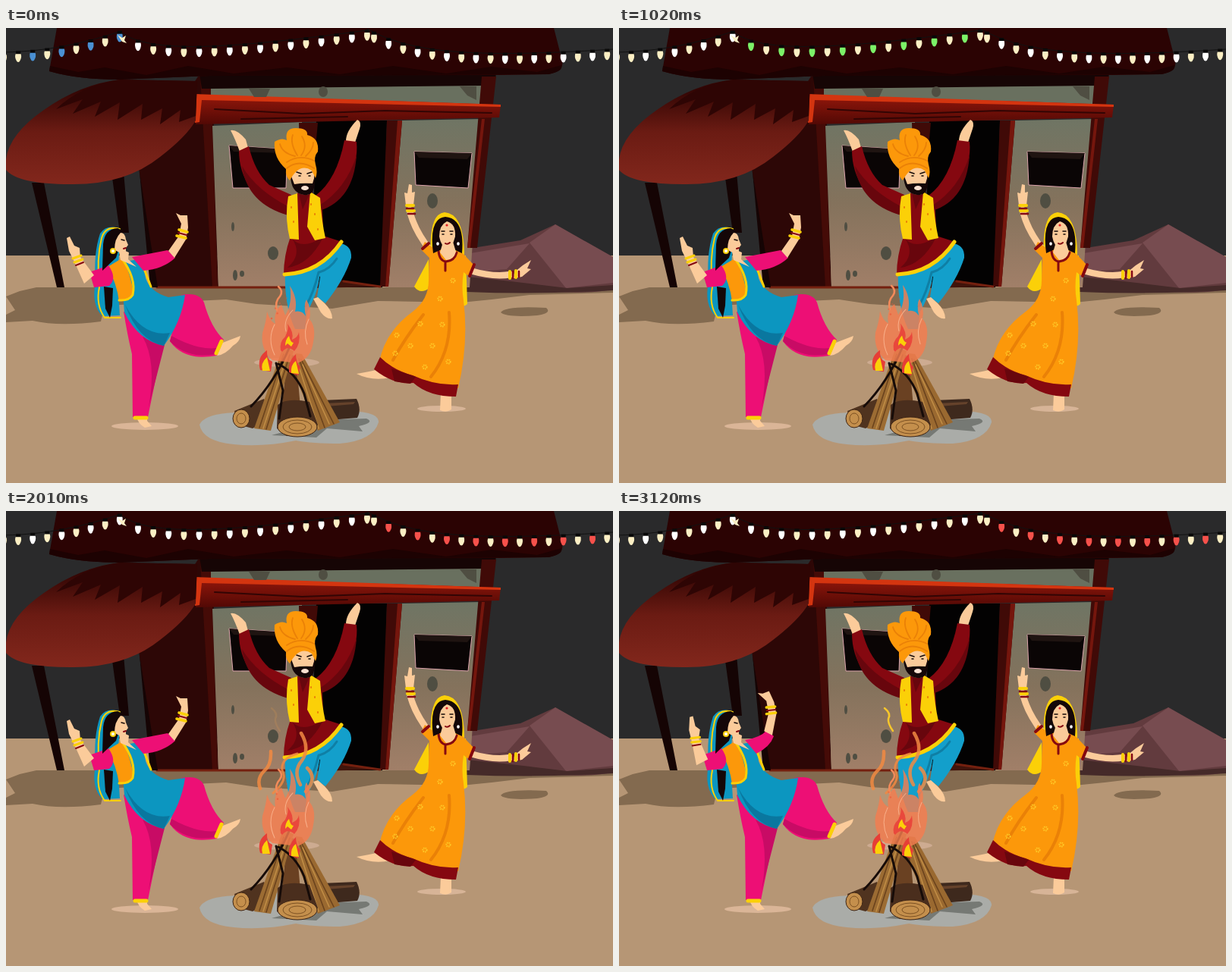
These frames come from a looping animation (800x600 px, 3.15 s). An HTML page:

```html
<!DOCTYPE html>
<html lang="en">
<head>
<meta charset="utf-8">
<title>Bonfire dance</title>
<style>
html,body{margin:0;width:100%;height:100%;overflow:hidden;background:#2a2a2b}
svg{display:block;width:800px;height:600px}
.skin{fill:#fbcb9a}.skinLine{fill:none;stroke:#fbcb9a;stroke-width:8.5;stroke-linecap:round}
.maroon{fill:#850810}.deep{fill:#68060d}.teal{fill:#0c96c0}.blue{fill:#139fcb}.pink{fill:#ed0f75}
.orange{fill:#fc980a}.yellow{fill:#fbd008}.black{fill:#140708}
.line{fill:none;stroke-linecap:round;stroke-linejoin:round}
.yl{stroke:#fbd008}.ml{stroke:#850810}.ol{stroke:#ea8107}.kl{stroke:#160b08}
.B,.b .A{display:none}.b .B{display:inline}
.b #manLeft{transform:scale(.94);transform-origin:370px 245px}
.b #manRight{transform:scale(1,.95);transform-origin:415px 240px}
.b #wristLeft{transform:rotate(13deg);transform-origin:110px 332px}
.b #wristRight{transform:translate(-20px,-5px) rotate(-21deg);transform-origin:216px 302px}
#lady.b{transform:translate(-1px,-10px)}
.b #raised{transform:scale(1,.91);transform-origin:555px 290px}
.bulb{fill:#fff}.cream{fill:#fcefc4}
.c0 .s0{fill:#4a90d2}.c1 .s1{fill:#7cf268}.c2 .s2{fill:#f6514b}
</style>
</head>
<body>
<svg id="stage">
<defs>
<linearGradient id="thatch" x2="0" y2="1"><stop offset=".1" stop-color="#330604"/><stop offset=".5" stop-color="#6b1b13"/><stop offset="1" stop-color="#82271c"/></linearGradient>
<linearGradient id="wall" x2="0" y2="1"><stop stop-color="#6f7564"/><stop offset=".5" stop-color="#84725c"/><stop offset="1" stop-color="#a17f68"/></linearGradient>
<linearGradient id="beam" x2="0" y2="1"><stop stop-color="#94170b"/><stop offset="1" stop-color="#520905"/></linearGradient>
</defs>

<!-- ground and yard -->
<path fill="#2a2a2b" d="M0 0H800V300H0Z"/>
<path fill="#b69675" d="M0 300H800V600H0Z"/>
<path fill="#836a4f" d="M0 354L18 347L40 342H640L800 346V349L690 352L640 358L600 362L490 360L430 370L330 364L290 358L130 366L125 387Q70 394 35 386L0 388V378L12 372Z"/>
<path fill="#836a4f" d="M652 375Q658 366 712 369Q720 376 700 379Q660 382 652 375Z"/>
<path fill="#623b3e" d="M603 292L678 280L724 259L800 302V345Q760 352 700 346L607 348Z"/>
<path fill="#774c50" d="M612 297L690 284L660 318L612 322ZM690 283L724 259L800 302V336L738 343Z"/>
<path fill="#452a29" d="M608 328L665 334L740 343L800 339V346Q700 352 607 348Z"/>

<!-- hut -->
<path fill="#2d0706" d="M175 185L253 64H272L280 343H198Z"/>
<path fill="#450b07" d="M256 64H270L279 342H272Z"/>
<path fill="#160505" d="M255 60H646L643 80H258Z"/>
<path fill="#69705f" d="M270 80L630 76V102L270 93Z"/>
<path fill="url(#wall)" d="M272 129L390 124L394 342H280ZM520 122L626 120L611 342H500Z"/>
<path fill="#030202" d="M409 122H502L496 342H402Z"/>
<path fill="#40140b" d="M404 336L440 332L495 341L404 343Z"/>
<path fill="#400a07" d="M386 125H411L404 200V342H392ZM502 122H522L504 341H493ZM627 64H646L621 290H608Z"/>
<path fill="#75160d" d="M516 122H522L504 341H500ZM627 120H631L612 290H608Z"/>
<path fill="url(#beam)" d="M248 88L652 101L650 118L250 127Z"/>
<path fill="#d43510" d="M248 87L652 101V104L258 95L255 124L249 125Z"/>
<path class="line" stroke="#320504" stroke-width="2" d="M275 107L390 113L500 109L640 112M310 120L450 117"/>
<path fill="#0a0505" stroke="#dca4ac" d="M294 155L371 160L369 211H299ZM538 163L614 165L609 211L540 207Z"/>
<path fill="#1f1411" d="M294 155L371 160V165L300 163ZM538 163L614 165L608 173L544 171Z"/>
<path class="line" stroke="#74200f" stroke-width="3" d="M199 342H395M445 334L493 341"/>
<g fill="#4f4e42"><ellipse cx="352" cy="297" rx="7" ry="9"/><ellipse cx="562" cy="228" rx="7" ry="10"/><ellipse cx="418" cy="84" rx="6" ry="7"/><ellipse cx="299" cy="262" rx="2" ry="6"/><ellipse cx="302" cy="326" rx="3" ry="7"/><ellipse cx="311" cy="324" rx="3" ry="4"/><path d="M320 80h28l-5 11h-16zM598 77h22v18l-12-6z"/></g>
<path fill="#150404" d="M34 204H50L77 342H67ZM139 190H155L162 270H150ZM176 190L200 342H190Z"/>
<path fill="url(#thatch)" d="M150 68L252 70L250 122Q238 143 203 170Q157 207 85 206Q15 206 0 187Q-5 146 50 108Q98 74 150 68Z"/>
<path fill="#2e0504" d="M150 68L252 70L250 116L228 124L230 108L203 127L206 106L178 121L180 100L147 121L150 98L117 117L125 97L88 113L101 94L66 107Q98 76 150 68Z"/>
<path fill="#2b0303" d="M67 0L57 57Q95 68 150 68L270 63L650 62L715 61Q736 57 733 43L722 0Z"/>
<path fill="#1d0202" d="M58 50L95 58L130 52L185 62L240 50L300 60L370 52L440 61L510 50L580 60L640 51L700 58L732 49Q735 57 715 61L270 63L150 68Q95 68 57 57Z"/>
<g id="lights"></g>

<!-- turbaned dancer -->
<g id="man">
<ellipse cx="370" cy="441" rx="43" ry="6" fill="#cdab91"/>
<path class="blue A" d="M368 318L414 315Q414 345 397 374L394 397H381Q366 365 368 318Z"/>
<path class="blue B" d="M368 318L414 315Q412 345 395 370L393 380H372Q365 345 368 318Z"/>
<path class="blue" d="M400 318L438 284Q456 285 455 303Q446 332 421 363L410 355L414 328Z"/>
<path class="line" stroke="#0f7fa5" stroke-width="3" d="M412 322Q406 348 395 367M413 322Q427 318 436 304"/>
<path class="skin" d="M411 355L420 363Q430 373 430 383Q423 385 415 375L405 357Z"/>
<path class="maroon" d="M372 224L386 217H402L416 226Q418 252 418 274L443 282Q416 326 366 325Q366 300 375 275Z"/>
<path class="deep" d="M376 276Q388 294 418 276Q400 312 371 316Q392 298 376 276Z"/>
<path class="line yl" stroke-width="5" d="M367 325Q414 323 442 282"/>
<g id="manLeft"><path class="skin" d="M319 158L308 163Q302 146 296 135Q304 133 316 147Z"/><path class="maroon" d="M307 162L320 156Q328 190 347 207L376 220L372 247Q340 236 322 212Q307 188 307 162Z"/><path class="deep" d="M311 182Q330 214 373 236L372 247Q318 232 311 182Z"/></g>
<g id="manRight"><path class="skin" d="M448 149Q448 136 463 121Q469 123 466 133L460 151Z"/><path class="maroon" d="M446 148L462 150Q465 178 447 210Q432 235 412 241L408 221Q436 200 446 148Z"/><path class="deep" d="M462 168Q448 212 413 234V241Q458 227 462 168Z"/></g>
<path class="yellow" d="M372 222L384 218L386 279L374 278Q367 250 372 222ZM401 216L414 224Q416 255 421 277L407 280L397 262Z"/>
<path class="line ol" stroke-width="2" d="M376 236v1M379 255v1M407 245v1M411 265v1M402 232v1"/>
<path class="deep" d="M386 218L391 239L401 217Z"/>
<path class="skin" d="M375 185Q390 174 407 187L405 212L398 220L388 219Q375 210 375 185Z"/>
<path class="black" d="M375 193L380 206Q391 204 404 205L407 195Q409 222 393 220Q375 218 375 193Z"/>
<ellipse cx="394" cy="211" rx="5" ry="3" fill="#f8e0d0"/>
<path class="line kl" stroke-width="1.6" d="M383 190l6 2M397 192l6-2M386 195h2M399 195h2"/>
<path class="orange" d="M369 186Q352 171 354 150Q363 144 370 148Q367 132 382 132Q398 132 397 141Q413 145 411 163Q405 170 408 180Q411 190 408 198L403 188Q387 177 374 201Q368 196 369 186Z"/>
<path class="line ol" stroke-width="1.8" d="M370 177Q387 166 406 175M370 185Q386 172 406 185M381 169Q364 165 361 153M384 168Q374 152 378 141M389 168Q398 156 390 143M395 169Q405 160 405 151"/>
</g>

<!-- dancer with blue scarf -->
<g id="girl">
<ellipse cx="183" cy="525" rx="44" ry="5" fill="#dab597"/>
<path class="teal" d="M151 265Q133 258 124 271Q115 298 118 335Q112 365 127 380L150 379L147 330Z"/>
<path class="line yl" stroke-width="2" d="M150 265Q131 260 126 277Q119 305 123 342Q118 365 130 382H151"/>
<path class="black" d="M129 341L141 343L140 366L137 382L131 370Z"/>
<path class="pink" d="M155 374L216 405L205 425L187 513H167L166 430Q160 405 155 374Z"/>
<path fill="#c80b65" d="M180 407L209 418L188 500Q199 440 180 407Z"/>
<path class="skin" d="M172 512H186V518L192 525L183 527Q174 522 172 512ZM283 416Q296 411 309 406Q308 414 299 419Q289 431 278 432Z"/>
<path class="pink" d="M231 352Q255 348 261 362Q270 395 287 411L278 432Q235 440 216 413Z"/>
<path fill="#c80b65" d="M218 406Q252 425 278 422L276 430Q239 437 216 413Z"/>
<path class="line yl" stroke-width="5" d="M170 514H185M284 413L277 429"/>
<path class="teal" d="M151 309L180 304L184 330Q190 348 214 355L236 352Q231 388 208 419Q174 412 156 375Z"/>
<path fill="#0a779f" d="M157 365Q180 408 216 402L208 419Q174 412 157 365Z"/>
<path class="orange" d="M134 315L154 303Q166 330 168 351Q162 361 149 360Q146 337 134 315Z"/>
<path class="line yl" stroke-width="3" d="M152 303Q172 330 167 352Q162 360 149 359M176 302L191 341"/>
<path class="skin" d="M148 290L162 296L161 305L172 315L151 306Z"/>
<path class="pink" d="M110 322L135 313Q147 330 136 340L116 342Z"/>
<path class="pink A" d="M166 302L213 293L223 303Q207 318 181 320Z"/>
<path class="pink B" d="M166 302Q186 299 195 289L204 297Q199 311 181 320Z"/>
<g id="wristLeft"><path class="skin" d="M103 337L90 308L83 294L80 277L84 275L90 287L97 290L98 302L116 326Z"/><path class="line yl" stroke-width="3" d="M88 304l11-4M90 309l11-4"/><path class="line ml" stroke-width="2" d="M92 313l10-4"/></g>
<g id="wristRight"><path class="skin" d="M214 294L228 274L231 258L224 244L230 247L239 247L240 263L237 279L222 303Z"/><path class="line yl" stroke-width="3.5" d="M228 266l11 3M225 274l12 3"/><path class="line ml" stroke-width="2" d="M227 270l11 3"/></g>
<path class="black" d="M128 285Q130 265 147 264Q155 266 154 275L145 303L127 320Z"/>
<path class="skin" d="M151 270Q157 270 158 279L161 286L158 290V295Q151 299 143 292Q143 278 151 270Z"/>
<path class="line kl" stroke-width="1.5" d="M152 279l4 1"/><path class="line ml" stroke-width="2" d="M155 291l3-1"/>
<circle class="yellow" cx="141" cy="294" r="4"/><circle cx="141" cy="294" r="2" fill="#fff"/>
</g>

<!-- dancer in the long dress -->
<g id="lady">
<ellipse cx="574" cy="502" rx="32" ry="4" fill="#d7b497"/>
<path class="yellow" d="M557 305L538 341Q546 352 558 343ZM594 300H606L608 364Q602 370 597 361ZM560 300Q557 245 578 243Q605 245 604 305Z"/>
<path class="skin" d="M573 482H587V503Q580 508 572 504ZM462 456Q480 453 492 450L507 461Q482 466 462 456Z"/>
<g id="raised"><path class="skinLine" d="M559 293Q537 265 532 240"/><path class="skin" d="M527 234L525 217L529 218L531 206L535 207L535 217L539 216L537 234Z"/><path class="line yl" stroke-width="4" d="M528 234H537M529 241H538"/><path class="line ml" stroke-width="2.5" d="M528 238H537M530 245H539"/></g>
<path class="skinLine" d="M612 320Q643 329 665 325"/>
<path class="skin" d="M670 322L681 313L692 306L687 317L692 318L680 328L669 330Z"/>
<path class="line yl" stroke-width="4" d="M664 321v9M672 320v9"/><path class="line ml" stroke-width="2.5" d="M668 321v9M676 321v7"/>
<path class="orange" d="M552 282L566 292L599 294L617 313L611 328L603 322Q600 342 603 359Q610 415 596 475Q533 473 492 440Q500 400 536 374Q557 358 557 333L558 303L547 292Z"/>
<path class="line ol" stroke-width="4" d="M550 378Q525 410 510 438M584 375Q588 425 560 460"/>
<path class="maroon" d="M493 434Q510 451 536 458Q566 472 596 470L593 486Q557 486 537 468Q511 471 485 450Z"/>
<path class="deep" d="M508 449L540 460L533 469L512 466Z"/>
<path class="line ml" stroke-width="4" d="M549 291L557 284M617 312L611 327"/>
<path class="line ml" stroke-width="3" d="M570 294Q571 307 580 308Q591 307 594 296M579 308V320"/>
<g id="flowers"></g>
<path class="black" d="M563 297Q557 251 579 249Q605 251 601 297L590 292H574Z"/>
<path class="skin" d="M576 282H589L593 295Q590 306 580 306L572 296Z"/>
<path class="skin" d="M581 255Q593 258 592 275Q588 290 582 293Q573 287 571 275Q571 260 581 255Z"/>
<path class="line kl" stroke-width="1.6" d="M574 268h4M585 268h4M575 272h2M586 272h2"/>
<path class="line ml" stroke-width="2" d="M579 284Q582 286 585 283"/><circle cx="581" cy="260" r="1.6" fill="#e21f24"/>
<path class="line" stroke="#fff" stroke-width="3.5" d="M569 284v1M596 284v1"/>
</g>

<!-- ash and wood -->
<path fill="#aaaca8" d="M255 523Q263 507 310 507Q390 499 450 505Q493 506 491 520Q484 544 440 548Q404 548 382 544Q338 553 300 549Q259 545 255 523Z"/>
<path fill="#767974" d="M410 517L475 515Q487 520 465 525L470 532L423 528L409 540L350 537L390 526Z"/>
<path fill="#3e291d" d="M415 491L462 489Q469 503 463 514L426 517Z"/>
<path fill="#65422b" d="M420 495L460 493L458 496L422 499Z"/>
<path fill="#50331f" d="M301 505L340 489L354 512L325 528L306 523Z"/>
<path fill="#6a4122" d="M371 431L382 432L388 500L363 506Z"/>
<path fill="#9c6c33" d="M365 421L379 426L349 531L327 528Z"/><path fill="#9a6930" d="M382 429L390 430L440 520L411 531L384 466Z"/>
<path class="line" stroke="#6b431d" stroke-width="1.6" d="M366 430L334 527M374 431L343 529M386 436L420 527M389 437L432 522"/>
<path class="line" stroke="#c08d45" stroke-width="1.6" d="M372 427L339 528M384 440L412 528M391 444L426 522"/>
<path fill="#4a2e1d" d="M358 497Q370 487 400 493L411 523Q405 539 370 538L357 528Z"/>
<g fill="#c48f4c" stroke="#3d2414"><ellipse cx="310" cy="515" rx="11" ry="12"/><ellipse cx="384" cy="526" rx="26" ry="13"/><ellipse cx="384" cy="526" rx="19" ry="9" stroke="#7c5123"/><ellipse cx="384" cy="526" rx="11" ry="5" stroke="#7c5123"/><ellipse cx="310" cy="515" rx="6" ry="7" stroke="#7c5123"/></g>
<path class="line kl" stroke-width="3" d="M323 499Q355 466 374 420M359 443Q382 455 393 482L401 512M356 442L365 478L360 515M376 456L384 447"/>

<!-- fire -->
<g class="line" stroke="#f28a42" id="tongues"><path stroke-width="4.5" d="M349 317Q350 335 340 343Q330 353 335 366M389 293Q401 313 390 329Q378 343 388 361M397 339Q411 352 395 370"/><path stroke-width="3" d="M384 320Q362 326 364 342Q372 355 352 372"/></g>
<path id="wisp" class="line" stroke-width="2.5" d="M350 260Q359 267 355 274Q354 280 361 290"/>
<g id="core">
<path fill="#f57d50" opacity=".82" d="M351 438Q335 424 338 402Q343 387 344 374Q348 387 355 390Q352 374 363 365L368 379Q378 363 374 340Q385 356 381 374Q390 372 395 380Q392 364 396 358Q403 371 400 384Q409 394 405 414Q402 436 384 442Z"/>
<path class="line" stroke="#f28a5a" stroke-width="2.5" d="M359 341Q366 347 361 354Q354 361 357 372"/>
<path class="line" stroke="#f9b08b" d="M354 391Q344 410 354 431M378 372Q365 385 369 400M399 384Q391 400 397 417"/>
<path fill="#e9483c" d="M362 425Q360 414 368 407Q373 397 371 390Q380 402 377 411Q385 408 386 401Q389 416 380 426Q371 418 364 427Z"/>
<path class="yellow" d="M368 419Q368 411 373 406Q375 415 379 415L376 420L371 416Z"/>
<path fill="#e63e36" d="M335 451Q330 434 344 425Q343 437 351 440L349 453ZM373 454Q371 440 382 430Q382 441 388 447L385 458Z"/>
<path class="yellow" d="M338 452Q335 442 344 434L348 452ZM376 455Q375 444 382 439L386 456Z"/>
</g>
<g id="sparks" fill="#ee5937"></g>
</svg>
<script>
const $ = id => document.getElementById(id);
const LOOP = 3150, BEAT = 450;
const clamp = v => Math.max(0, Math.min(1, v));
const mix = (p, t) => {
  const u = 1 - t;
  return u*u*u*p[0] + 3*u*u*t*p[1] + 3*u*t*t*p[2] + t*t*t*p[3];
};

function solve(xs, x) {
  let lo = 0, hi = 1;
  for (let i = 0; i < 20; i++) {
    const m = (lo + hi) / 2;
    if (mix(xs, m) < x) lo = m; else hi = m;
  }
  return lo;
}

// Each strand: curve x, curve y, first bulb, spacing, bulb count, lit parity
const strands = [
  [[-10, 40, 92, 152], [40, 40, 32, 12], -3, 19.1, 9, 0],
  [[152, 190, 290, 476], [14, 42, 36, 11], 174, 20.13, 16, 0],
  [[476, 525, 590, 800], [9, 36, 50, 36], 485, 19.2, 17, 1]
];
$('lights').innerHTML = strands.map(([xs, ys, start, step, count, lit], s) => {
  const pts = xs.map((x, i) => `${x} ${ys[i] - 8}`);
  let out = `<path class="line" stroke="#111" d="M${pts[0]}C${pts.slice(1)}"/>`;
  for (let i = 0; i < count; i++) {
    const x = start + step * i, y = mix(ys, solve(xs, x));
    const on = x > 0 && i % 2 === lit;
    out += `<g transform="translate(${x} ${y})"><path fill="#080808" d="M-3-9H3V-4H-3Z"/>` +
      `<path class="bulb ${on ? 's' + s : 'cream'}" d="M-3.5-5H3.5Q5 0 2 4.500Q0 7-2 4.500Q-5 0-3.5-5Z"/></g>`;
  }
  return out;
}).join('') + '<path fill="#fcefc4" d="M147 9L153 13L158 10L156 16L159 20L153 18Z"/>';

$('flowers').innerHTML = [[572,357],[546,390],[515,405],[533,419],[562,419],[575,391],[583,440],[513,429],[552,447],[589,333]]
  .map(([x, y]) => `<circle cx="${x}" cy="${y}" r="2.6" fill="none" stroke="#ffc928" stroke-width="2" stroke-dasharray="1.5 1"/>`).join('');
$('sparks').innerHTML = '<circle r="1.2"/>'.repeat(6);
const sparks = [...$('sparks').children];

function draw() {
  const t = performance.now() % LOOP, beat = Math.floor(t / BEAT), up = beat % 2 === 1;
  $('man').classList.toggle('b', up);
  $('lady').classList.toggle('b', up);
  $('girl').classList.toggle('b', up || beat === 6);
  $('lights').setAttribute('class', 'c' + Math.min(2, Math.floor(t / 900)));

  const wave = Math.sin(t / LOOP * Math.PI * 14);
  $('core').setAttribute('transform', `translate(0 442) scale(1 ${1 + .012 * wave}) translate(0 -442)`);
  $('tongues').setAttribute('opacity', .85 * clamp((t - 1050) / 900));
  $('wisp').setAttribute('opacity', clamp((t - 1900) / 600));
  $('wisp').setAttribute('stroke', t < 2450 ? '#e9a04d' : '#f8c72b');
  sparks.forEach((dot, i) => {
    const rise = (t / 1050 + i / 6) % 1;
    dot.setAttribute('cx', 350 + i * 53 % 49 + 4 * Math.sin(rise * 6 + i));
    dot.setAttribute('cy', 383 - 40 * rise);
    dot.setAttribute('opacity', .8 * (1 - rise));
  });
  requestAnimationFrame(draw);
}
draw();
</script>
</body>
</html>
```
